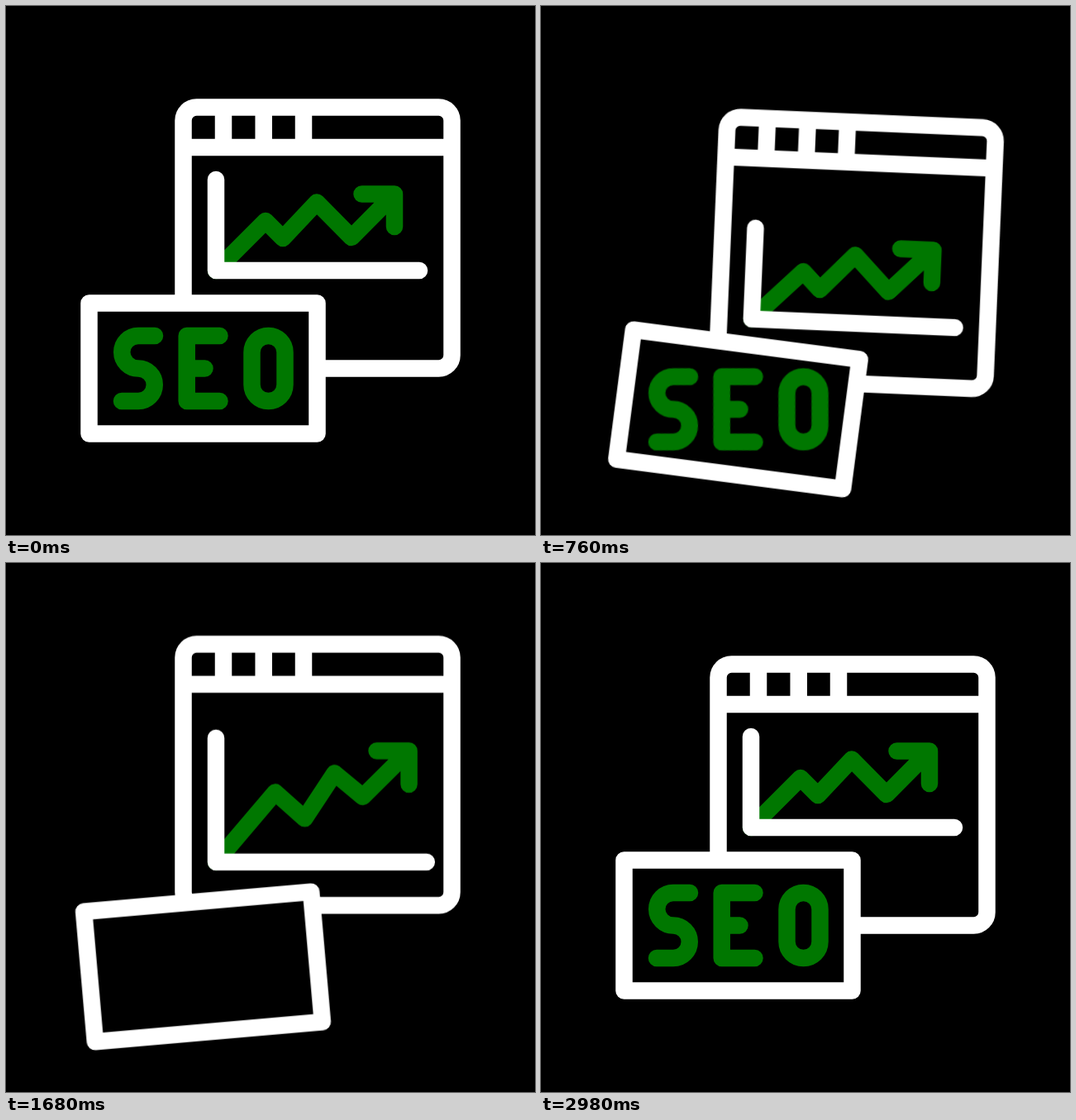
Recreate the animation shown at these times as an HTML page without scripts. Size 640x640 px, loop 3.3 s.

```html
<!DOCTYPE html>
<html lang="en">
<head>
<meta charset="utf-8">
<title>SEO growth</title>
<style>
@property --tilt { syntax: "<angle>"; inherits: true; initial-value: 0deg; }

html, body { margin: 0; height: 100%; overflow: hidden; background: #000; }
svg { display: block; width: 100vw; height: 100vh; }

.line { fill: none; stroke: #fff; stroke-width: 20.5; stroke-linecap: round; stroke-linejoin: round; }
.solid { fill: #000; }
.green { stroke: #007700; }
.flat { stroke-linecap: butt; }

.move {
  animation: 3300ms cubic-bezier(.35, 0, .65, 1) infinite both;
}

/* browser window */
.win-tilt { transform-origin: 377px 400px; animation-name: win-tilt; }
.win { animation-name: win; }
.chart { animation-name: chart; }
.axis { animation-name: axis; }
.trend { animation-name: trend; }

@keyframes win-tilt {
  0%, 2.42% { transform: rotate(0deg); }
  14.55% { transform: rotate(-1.6deg); }
  24.24% { transform: rotate(2.6deg); }
  36.97%, 100% { transform: rotate(0deg); }
}
@keyframes win {
  0% { transform: translateY(0); }
  9.7% { transform: translateY(-49.3px); }
  19.39% { transform: translateY(25px); }
  34.85%, 74.2% { transform: translateY(-24.3px); }
  86.36%, 100% { transform: translateY(0); }
}
@keyframes chart {
  0% { transform: translateY(0); }
  9.7% { transform: translateY(-49.3px); }
  22.27% { transform: translateY(64px); }
  37.58%, 73.33% { transform: translateY(41.7px); }
  86.36%, 100% { transform: translateY(0); }
}
@keyframes axis {
  0%, 23.03%, 62.42%, 100% { d: path("M254 210L254 320L500 320"); }
  31.52% { d: path("M254 214L254 320L488 320"); }
  49.7% { d: path("M254 169L254 320L509 320"); }
}
@keyframes trend {
  0%, 23.03%, 62.42%, 100% {
    d: path("M254 320L314 260L335 281L376 237.5L418 280L470 227.5M430.5 227.5L470 227.5L470 267");
  }
  31.52% {
    d: path("M254 320L313 260L333 281L372 237.5L413 280L464.5 227.5M427 227.5L464.5 227.5L464.5 269");
  }
  49.7% {
    d: path("M254 320L326 235L362 267L398 212L432 240L488 184.5M449 184.5L488 184.5L488 225");
  }
}

/* card */
.card { animation-name: card; }
.card-tilt { animation-name: card-tilt; }
.tilted, .upright { transform-origin: 238.5px 438.5px; }
.tilted { transform: rotate(var(--tilt)); }
.upright { transform: rotate(calc(-1 * var(--tilt))); }
.letter { animation-name: letter; }
.letter:nth-child(2) { animation-delay: 60ms; }
.letter:nth-child(3) { animation-delay: 110ms; }

@keyframes card {
  0% { transform: translateY(0); }
  9.7% { transform: translateY(-65px); }
  23.64%, 73.33% { transform: translateY(50px); }
  86.36%, 100% { transform: translateY(0); }
}
@keyframes card-tilt {
  0%, 4.85% { --tilt: 0deg; }
  13.03% { --tilt: -7deg; }
  22.73% { --tilt: 7.5deg; }
  32.12%, 73.33% { --tilt: -5deg; }
  86.36%, 100% { --tilt: 0deg; }
}
@keyframes letter {
  0%, 24.09% { transform: translateY(0); }
  36.21%, 45% { transform: translateY(-145px); }
  45.01%, 59.55% { transform: translateY(140px); }
  75%, 100% { transform: translateY(0); }
}

/* arcs sweeping out from behind the window */
.sweep { animation-timing-function: linear; }
.sweep-a { transform-origin: 320px 250px; animation-name: sweep-a; }
.sweep-b { transform-origin: 406px 241px; animation-name: sweep-b; }

@keyframes sweep-a {
  0%, 23.99% { transform: rotate(60deg); opacity: 0; }
  24% { transform: rotate(60deg); opacity: 1; }
  34.7% { transform: rotate(321deg); opacity: 1; }
  34.71%, 100% { transform: rotate(321deg); opacity: 0; }
}
@keyframes sweep-b {
  0%, 82.11% { transform: rotate(150deg); opacity: 0; }
  82.12% { transform: rotate(150deg); opacity: 1; }
  90% { transform: rotate(410deg); opacity: 1; }
  90.01%, 100% { transform: rotate(410deg); opacity: 0; }
}
</style>
</head>
<body>
<svg viewBox="0 0 640 640" role="img" aria-label="SEO">
  <defs>
    <clipPath id="inside"><rect x="110.5" y="369.5" width="256" height="138"/></clipPath>
    <!-- 59 degrees of a circle with radius 200, starting at the right -->
    <path id="arc" d="M200 0A200 200 0 0 1 103 171.4"/>
  </defs>
  <rect width="640" height="640"/>

  <g class="line green">
    <g class="move sweep sweep-a"><use href="#arc" x="320" y="250"/></g>
    <g class="move sweep sweep-b"><use href="#arc" x="406" y="241"/></g>
  </g>

  <g class="move win-tilt">
    <g class="move win">
      <rect class="line solid" x="214.5" y="122.5" width="325" height="316" rx="16"/>
      <path class="line flat" d="M214.5 171H539.5M263 122.5V171M311.7 122.5V171M360 122.5V171"/>
    </g>
    <g class="move chart">
      <path class="line green move trend" d="M254 320L314 260L335 281L376 237.5L418 280L470 227.5M430.5 227.5L470 227.5L470 267"/>
      <path class="line move axis" d="M254 210L254 320L500 320"/>
    </g>
  </g>

  <g class="move card">
    <g class="move card-tilt">
      <g class="tilted">
        <rect class="line solid" x="100.5" y="359.5" width="276" height="158"/>
        <g clip-path="url(#inside)">
          <g class="upright line green">
            <path class="move letter" d="M180 399H160A19.75 19.75 0 0 0 160 438.5A19.75 19.75 0 0 1 160 478H140"/>
            <path class="move letter" d="M258.5 399H218.7V478H258.5M218.7 438.5H240.5"/>
            <rect class="move letter" x="297.5" y="399" width="40" height="79" rx="20"/>
          </g>
        </g>
      </g>
    </g>
  </g>
</svg>
</body>
</html>
```
